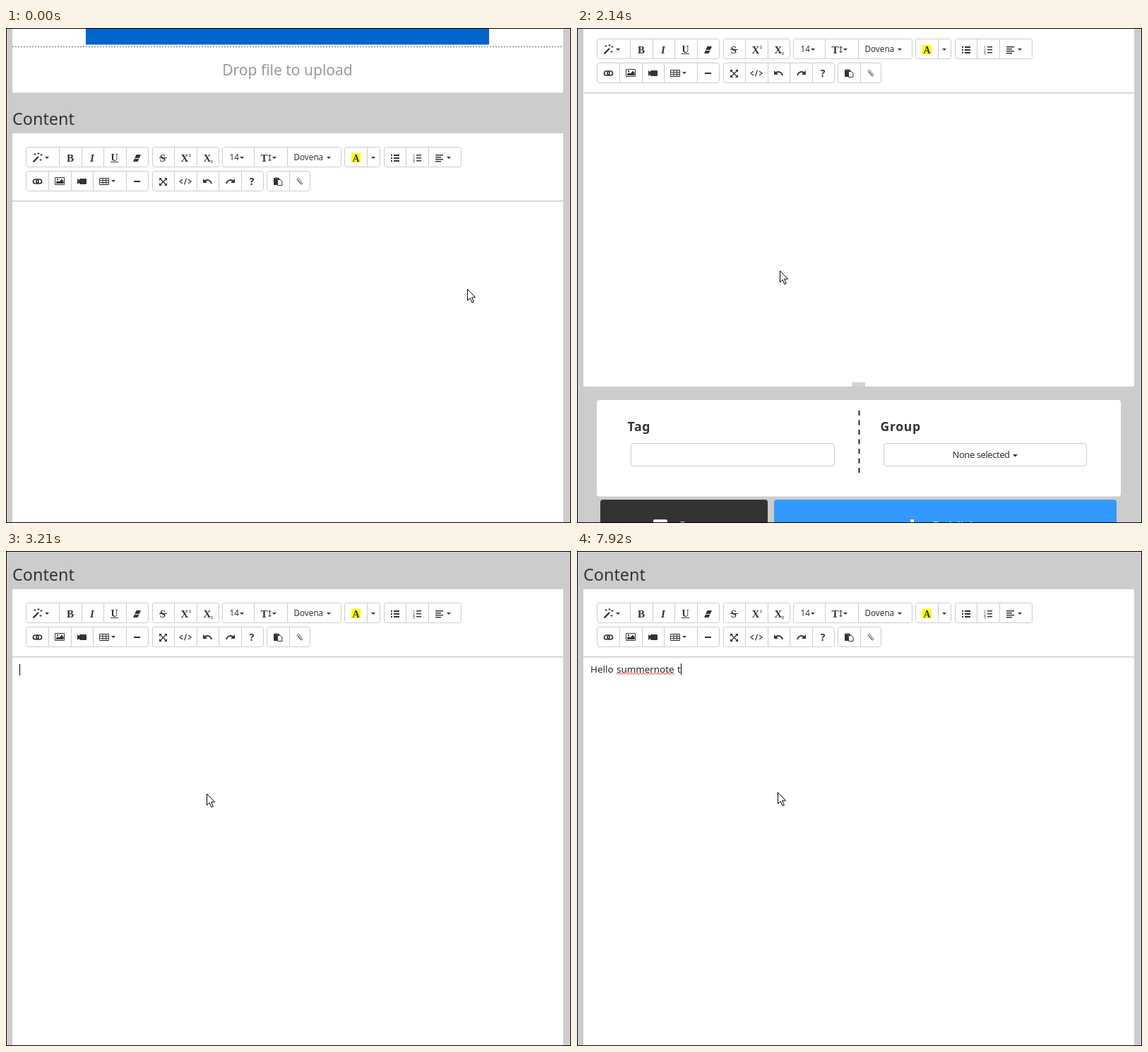
An HTML page that plays this animation: 800 px wide and 700 px high, repeating every 8 s.

```html
<!DOCTYPE html>
<html lang="en">
<head>
<meta charset="utf-8">
<title>Editor demo</title>
<style>
html, body { margin: 0; width: 100%; height: 100%; overflow: hidden; background: #ccc; }
svg { display: block; width: 100vw; height: 100vh; }
text { font-family: "Noto Sans", "Open Sans", sans-serif; fill: #333; white-space: pre; }
.serif { font-family: "Liberation Serif", "Noto Serif", serif; font-weight: bold; }
.line { fill: none; stroke: #333; }
.box { fill: #fff; stroke: #ccc; }
</style>
</head>
<body>
<svg id="stage" viewBox="0 0 800 700" xmlns="http://www.w3.org/2000/svg"></svg>
<script>
const LOOP = 8000;
const PANEL_TOP = 149, STICKY_TOP = -4, EDITOR_BOTTOM = 814, TEXT_X = 19;

const txt = (x, y, s, size, attrs = '') =>
  `<text x="${x}" y="${y}" font-size="${size}" ${attrs}>${s}</text>`;
const serif = (x, y, s, size, attrs = '') =>
  txt(x, y, s, size, `class="serif" text-anchor="middle" ${attrs}`);
const rect = (x, y, w, h, fill = '#333', r = 0) =>
  `<rect x="${x}" y="${y}" width="${w}" height="${h}" rx="${r}" fill="${fill}"/>`;
const shape = (d, fill = '#333') => `<path d="${d}" fill="${fill}"/>`;
const line = (d, w = 1, attrs = '') => `<path class="line" d="${d}" stroke-width="${w}" ${attrs}/>`;
const field = (x, y, w, h, r = 3) =>
  `<rect class="box" x="${x + .5}" y="${y + .5}" width="${w}" height="${h}" rx="${r}"/>`;
const arrow = (x, y, w = 6) => shape(`M${x - w / 2} ${y}h${w}l${-w / 2} ${w / 2}z`);

// Button group: left edge, right edge, inner dividers
function group(y, left, right, ...dividers) {
  return field(left, y, right - left, 28) +
    dividers.map(x => rect(x, y + 1, 1, 27, '#ccc')).join('');
}

// Toolbar coordinates are relative to the top of the editor panel
function toolbar() {
  const groups =
    group(19, 28, 201, 75, 107, 138, 170) + group(19, 207, 301, 238, 270) +
    group(19, 306, 474, 351, 398) + group(19, 479, 529, 511) + group(19, 535, 644, 566, 598) +
    group(53, 28, 201, 60, 92, 123, 170) + group(53, 207, 364, 238, 270, 301, 333) +
    group(53, 369, 430, 401);
  const arrows = [58, 334, 380, 457, 520, 627].map(x => arrow(x, 33)).join('') + arrow(152, 66);

  const wand = line('M38.500 40.500L46 33', 2.4) +
    line('M41 28v3M39.500 29.500h3M46 27v3M44.500 28.500h3M50 29v3M48.500 30.500h3M49 36v3M47.500 37.500h3');
  const style = serif(91, 40, 'B', 15) +
    serif(122, 40, 'I', 15, 'font-style="italic"') +
    serif(153.5, 39, 'U', 14) + rect(148, 40, 11, 1) +
    shape('M184.500 30h6.500l-4.500 10h-6.500z') + line('M182.500 35.500h6', 1, 'style="stroke:#fff"');
  const script = serif(222, 40, 'S', 15) + rect(217, 34, 11, 1) +
    serif(253, 40, 'X', 15) + serif(260.5, 33, '2', 6) +
    serif(285, 40, 'X', 15) + serif(291.5, 42, '2', 6);
  const fonts = txt(316.5, 38, '14', 11.7) +
    serif(365.5, 40, 'T', 15) + line('M373.500 30v9M371.500 32l2-2 2 2M371.500 37l2 2 2-2') +
    txt(407.5, 38, 'Dovena', 11.7);
  const color = rect(489, 28, 13, 13, '#ff0') + serif(495.5, 40, 'A', 14);
  const lists = [0, 1, 2].map(i => {
    const y = 30 + i * 4;
    return rect(545, y, 2, 2) + rect(549, y, 8, 2) +
      txt(576, y + 3.5, i + 1, 5) + rect(581, y, 7, 1.5);
  }).join('') + [11, 8, 11, 8].map((w, i) => rect(608, 30 + i * 3, w, 1.5)).join('');

  const insert =
    `<rect class="line" x="38.500" y="65" width="7.500" height="6" rx="3" stroke-width="1.700"/>` +
    `<rect class="line" x="43" y="65" width="7.500" height="6" rx="3" stroke-width="1.700"/>` +
    line('M69.500 62.500h13v10h-13z') + shape('M71 71v-2l2.500-2 2 1.500 3.500-4 2.500 3v3.500z') +
    rect(72, 64, 2, 2) +
    rect(104, 64, 10, 8, '#333', 1) + shape('M101 64l4 3v2l-4 3z') +
    line('M132.500 63.500h13v9h-13zM132.500 66.500h13M132.500 69.500h13M137 63v10M141.500 63v10') +
    rect(181, 67, 9, 2);
  const view =
    line('M218.500 64.500l8 8M226.500 64.500l-8 8', 1.3) +
    shape('M217 63h4l-4 4zM228 63v4l-4-4zM217 74v-4l4 4zM228 74h-4l4-4z') +
    line('M250 65l-4 3 4 3M258 65l4 3-4 3M255.500 63.500l-3 9', 1.2) +
    line('M281 68c3-3 8-3 10 3', 2) + shape('M279 64v6h6z') +
    line('M322 68c-3-3-8-3-10 3', 2) + shape('M324 64v6h-6z') +
    txt(348, 73, '?', 14, 'font-weight="bold" text-anchor="middle"');
  const clip =
    rect(379, 63, 8, 10) + rect(381, 62, 4, 2, '#777') +
    `<path d="M384.500 65.500h4l2.500 2.500v5.500h-6.500z" fill="#fff" stroke="#333"/>` +
    line('M412 65l5 6.500q2 1.500 3-.5l-5-7q-2.500-1.500-3 1l4.500 5.500M414 66l4 5', 1, 'style="stroke:#667"');

  return rect(9, 0, 780, 96, '#fff', 2) + rect(9, 95, 780, 1.5, '#ccc') + groups + arrows +
    wand + style + script + fonts + color + lists + insert + view + clip;
}

// Coordinates relative to the bottom of the editor
function footer() {
  const grip = [-5.5, -3.5, -1.5].map(y => rect(389, y, 19, 1, '#aaa')).join('');
  const label = 'font-weight="bold" letter-spacing=".7"';
  const chevron = [0, 4, 8, 4, 0].map((dx, i) => rect(472 + dx, 188 + i * 4, 5, 4, '#fff')).join('');
  return grip + rect(28, 19, 742, 136.5, '#fff', 4) +
    txt(71.5, 63, 'Tag', 17.6, label) + txt(429.5, 63, 'Group', 17.6, label) +
    `<path d="M399.500 34v89" stroke="#222" stroke-width="2" stroke-dasharray="7 6.500"/>` +
    field(76, 80, 288, 32, 4) + field(434, 80, 287, 32, 4) +
    txt(531.5, 101, 'None selected', 13, 'letter-spacing="-.45"') + arrow(620.5, 96, 7) +
    rect(33, 160, 237, 76.5, '#333', 4) + rect(279, 160, 485, 76.5, '#39f', 4) +
    rect(108, 188, 20, 19, '#fff', 2) + rect(112, 196, 12, 7) +
    txt(143, 207, 'Save', 21, 'style="fill:#fff" letter-spacing="-.2"') +
    chevron + txt(502.5, 207, 'Publish', 21, 'style="fill:#fff" letter-spacing="-1.1"');
}

function squiggle(from, to, y) {
  let d = `M${from} ${y}`;
  for (let x = from + 2, up = true; x <= to; x += 2, up = !up) d += `L${x} ${up ? y - 2 : y}`;
  return `<path id="squiggle" d="${d}" fill="none" stroke="#e02020"/>`;
}

document.getElementById('stage').innerHTML = `
  ${rect(0, 0, 800, 700, '#ccc')}
  <g id="page">
    ${rect(9, -20, 780, 111.5, '#fff', 2)}
    ${rect(113, -20, 571, 43.5, '#06c')}
    <path d="M9 26.500H789" stroke="#888" stroke-width="1.500" stroke-dasharray="2 2"/>
    ${txt(398.5, 67, 'Drop file to upload', 21, 'text-anchor="middle" style="fill:#999"')}
    ${txt(9, 137, 'Content', 23.4)}
    ${rect(9, PANEL_TOP, 780, EDITOR_BOTTOM - PANEL_TOP, '#fff', 2)}
    ${txt(TEXT_X, 267, '', 13.4, 'id="typed" word-spacing="1" style="fill:#222"')}
    ${squiggle(56, 138, 269.5)}
    <rect id="caret" width="1" height="16"/>
    <g transform="translate(0 ${EDITOR_BOTTOM})">${footer()}</g>
  </g>
  <g id="toolbar">${toolbar()}</g>
  <path id="mouse" d="M.5 .5v16l3.700-3.500 2.700 6.300 2.400-1-2.700-6.300h5z" fill="#fff" stroke="#000"/>
  <rect x=".5" y=".5" width="799" height="699" fill="none" stroke="#000"/>`;

const $ = id => document.getElementById(id);
const page = $('page'), bar = $('toolbar'), typed = $('typed'), caret = $('caret'),
  mouse = $('mouse'), wave = $('squiggle');

const linear = u => u;
const smooth = u => u * u * (3 - 2 * u);

// Value at time t along [time, value] points
function along(points, t, ease = linear) {
  if (t <= points[0][0]) return points[0][1];
  for (let i = 1; i < points.length; i++) {
    const [t0, a] = points[i - 1], [t1, b] = points[i];
    if (t < t1) return a + (b - a) * ease((t - t0) / (t1 - t0));
  }
  return points[points.length - 1][1];
}

const SCROLL = [[900, 0], [960, 4], [1170, 4], [1630, 205], [2140, 307], [2190, 307],
  [2560, 456], [2770, 495], [2920, 495], [3200, 95]];
const MOUSE_X = [[70, 653], [900, 289], [1660, 289], [2020, 287], [2920, 287], [3200, 284]];
const MOUSE_Y = [[70, 369], [900, 342], [1660, 342], [2020, 343], [3560, 343], [3620, 341]];

// "<" is a backspace
const KEYS = 'Hello simmer<<<<<ummernote t';
const KEY_TIMES = [4070, 4160, 4310, 4400, 4550, 4720, 4820, 5170, 5230, 5380, 5530, 5600, 5680,
  5970, 6110, 6230, 6350, 6500, 6960, 7110, 7250, 7340, 7430, 7520, 7600, 7690, 7780, 7920];
const CLICK = 900, BLINK = 536, MARK = 7780;

function typedAt(t) {
  let s = '';
  for (let i = 0; i < KEYS.length && KEY_TIMES[i] <= t; i++) {
    s = KEYS[i] === '<' ? s.slice(0, -1) : s + KEYS[i];
  }
  return s;
}

function draw(t) {
  const scroll = Math.round(along(SCROLL, t));
  page.setAttribute('transform', `translate(0 ${-scroll})`);
  bar.setAttribute('transform', `translate(0 ${Math.max(PANEL_TOP - scroll, STICKY_TOP)})`);

  const s = typedAt(t);
  typed.textContent = s;
  const width = s ? typed.getComputedTextLength() : 0;
  const blinkOn = t >= CLICK && Math.floor((t - CLICK) / BLINK) % 2 === 0;
  caret.setAttribute('x', Math.round(TEXT_X + width));
  caret.setAttribute('y', s ? 254 : 255);
  caret.setAttribute('visibility', s || blinkOn ? 'visible' : 'hidden');
  wave.setAttribute('visibility', t >= MARK ? 'visible' : 'hidden');

  const x = Math.round(along(MOUSE_X, t, smooth)), y = Math.round(along(MOUSE_Y, t, smooth));
  mouse.setAttribute('transform', `translate(${x} ${y})`);
}

const start = performance.now();
function tick() {
  draw((performance.now() - start) % LOOP);
  requestAnimationFrame(tick);
}
tick();
</script>
</body>
</html>
```
